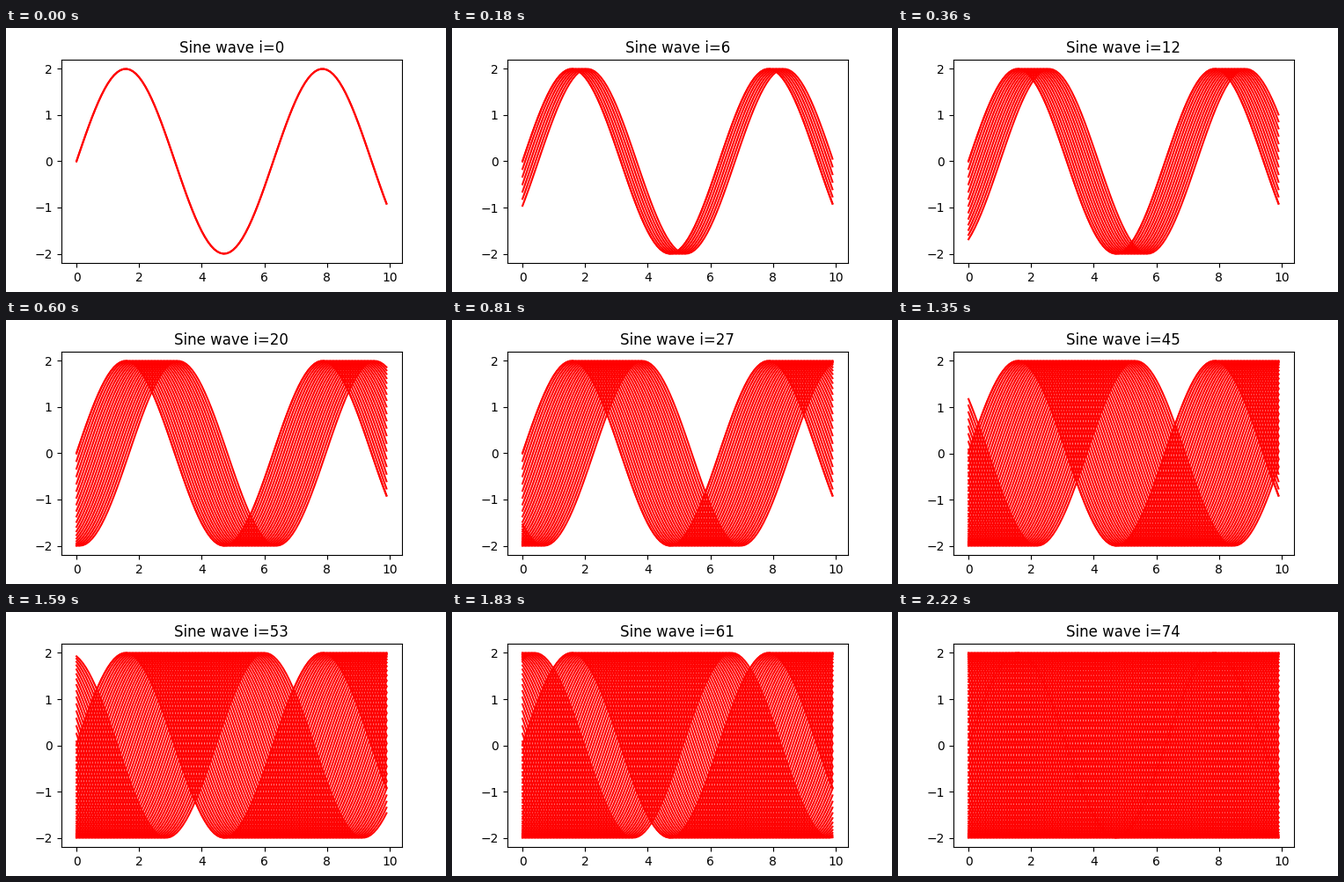
Recreate the animation shown at these times as a matplotlib script. Size 500x300 px, loop 2.25 s.

```python
import numpy as np
import matplotlib.pyplot as plt
from matplotlib.animation import FuncAnimation

FRAMES = 75
INTERVAL = 30

fig, ax = plt.subplots(figsize=(5, 3), dpi=100)
x = np.arange(0, 10, 0.1)


def wave(step):
    return 2 * np.sin(x - 2 * np.pi * step / FRAMES)


# The opening wave is drawn twice, which gives it a firmer edge.
ax.plot(x, wave(0), color="red")
waves = [ax.plot(x, wave(k), color="red")[0] for k in range(FRAMES)]


def update(i):
    for k, line in enumerate(waves):
        line.set_visible(k <= i)
    ax.relim(visible_only=True)
    ax.autoscale_view()
    ax.set_title(f"Sine wave i={i}")
    return waves


anim = FuncAnimation(fig, update, frames=FRAMES, interval=INTERVAL,
                     init_func=lambda: update(0), repeat=True,
                     repeat_delay=0, blit=False)
plt.show()
```
